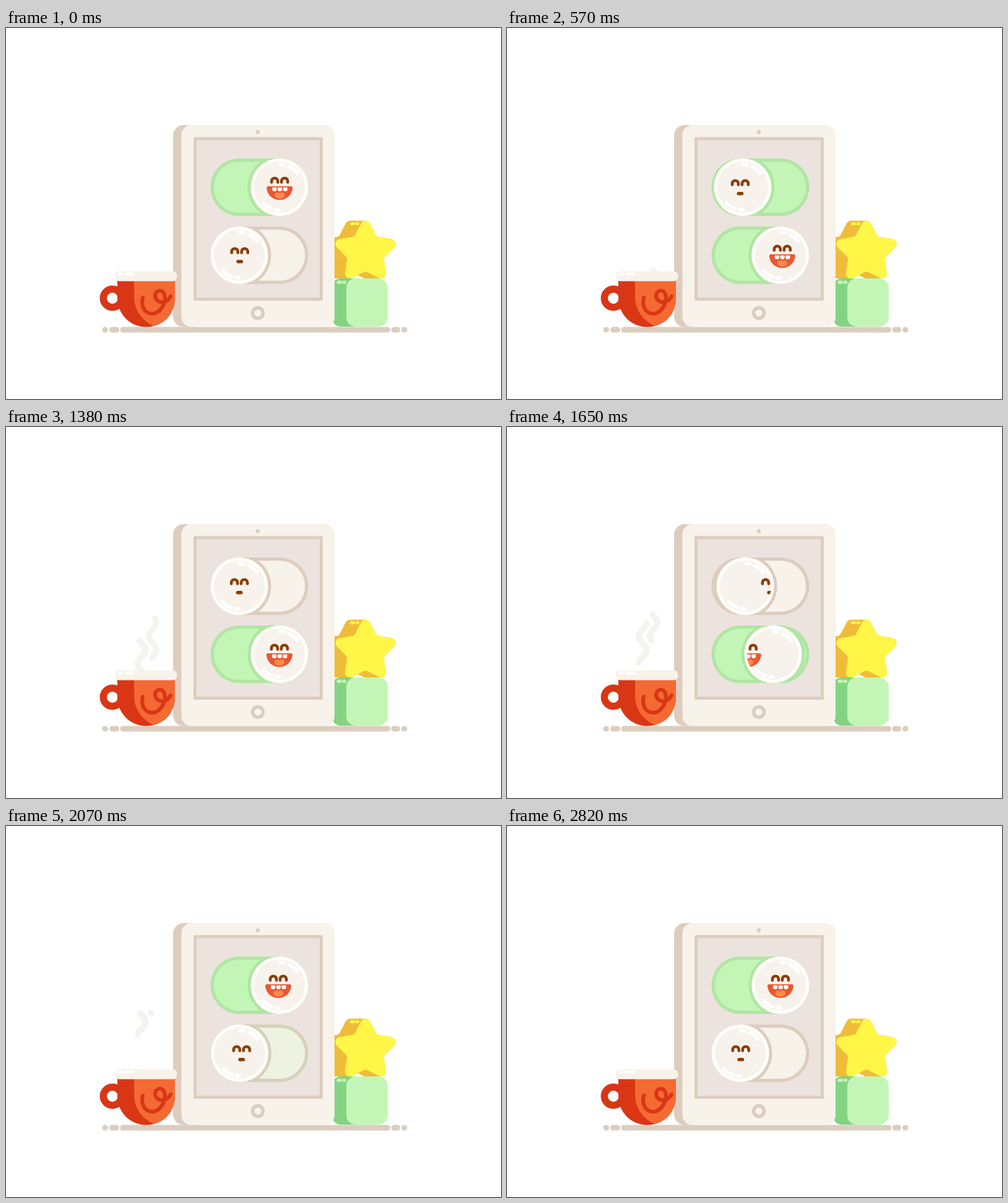
An HTML page with a canvas that plays this animation: 800 px wide and 600 px high, repeating every 2.85 s.

```html
<!DOCTYPE html>
<html lang="en">
<head>
<meta charset="utf-8">
<title>Toggles</title>
<style>
html, body { margin: 0; width: 100%; height: 100%; overflow: hidden; background: #fff; }
canvas { display: block; width: 800px; height: 600px; }
</style>
</head>
<body>
<canvas id="stage" width="800" height="600"></canvas>
<script>
const ctx = document.getElementById('stage').getContext('2d');
const LOOP = 2850, SWAP = 1380, STEP = 30;
const CREAM = '#f7f2ea', SAND = '#dccdbf', GREEN = '#c3f6b6', BROWN = '#8b3e04';
const RED = '#d93616', YELLOW = '#fff647', GOLD = '#efbc39';
const LEFT = 377, TRAVEL = 65, R = 46.5;
const OFF = { fill: [247, 242, 234], edge: [221, 205, 191] };
const ON = { fill: [195, 246, 182], edge: [177, 229, 164] };

const ramp = (t, a, b) => Math.min(1, Math.max(0, (t - a) / (b - a)));
const mix = (a, b, k) => `rgb(${a.map((v, i) => Math.round(v + (b[i] - v) * k)).join()})`;

function box(x0, y0, x1, y1, r, color) {
  ctx.fillStyle = color;
  ctx.beginPath();
  ctx.roundRect(x0, y0, x1 - x0, y1 - y0, r);
  ctx.fill();
}

function disc(x, y, r, color) {
  ctx.fillStyle = color;
  ctx.beginPath();
  ctx.arc(x, y, r, 0, Math.PI * 2);
  ctx.fill();
}

function stroke(path, color, width) {
  ctx.strokeStyle = color;
  ctx.lineWidth = width;
  ctx.lineCap = ctx.lineJoin = 'round';
  ctx.stroke(new Path2D(path));
}

function fill(path, color) {
  ctx.fillStyle = color;
  ctx.fill(new Path2D(path));
}

// ---------- still objects ----------

function ground() {
  for (const [a, b] of [[155.5, 165], [167, 183], [184.5, 621], [622.5, 637], [639, 648.5]])
    box(a, 483.5, b, 492.5, 4.5, SAND);
}

function star(cx, cy, color) {
  const pts = [];
  for (let i = 0; i < 10; i++) {
    const a = -Math.PI / 2 + i * Math.PI / 5, r = i % 2 ? 31 : 60;
    pts.push([cx + r * Math.cos(a), cy + r * Math.sin(a)]);
  }
  ctx.beginPath();
  ctx.moveTo((pts[9][0] + pts[0][0]) / 2, (pts[9][1] + pts[0][1]) / 2);
  pts.forEach((p, i) => ctx.arcTo(...p, ...pts[(i + 1) % 10], i % 2 ? 5 : 8));
  ctx.closePath();
  ctx.fillStyle = color;
  ctx.fill();
}

function toys() {
  box(527, 405, 600, 483, 14, '#84d383');
  box(550, 405, 617, 483, 15, GREEN);
  box(534.5, 408.5, 543, 414, 2.7, GREEN);
  box(543.5, 408.5, 550, 414, 2.7, GREEN);
  for (let dx = 25; dx >= 0; dx--) star(581 - dx, 362.5, GOLD);
  star(581, 362.5, YELLOW);
  box(556, 314, 564, 319, 2.5, YELLOW);
  box(564.5, 314, 571, 319, 2.5, YELLOW);
}

function tablet() {
  box(270, 157, 320, 483.5, 17, SAND);
  box(283.5, 157, 531, 483.5, 16, CREAM);
  disc(407, 168.5, 3.2, SAND);
  box(303, 176.5, 512, 441, 2, SAND);
  box(308, 181.5, 507, 436, 0, '#ece3de');
  disc(407, 461, 11.2, SAND);
  disc(407, 461, 5.8, CREAM);
}

function cup() {
  ctx.strokeStyle = RED;
  ctx.lineWidth = 11.5;
  ctx.beginPath();
  ctx.arc(172, 437, 14.7, 0, Math.PI * 2);
  ctx.stroke();
  fill('M180 405H273V437A46.5 46.5 0 0 1 180 437Z', RED);
  fill('M207 405H273V437C273 460 259 477 239 482C217 472 207 454 207 434Z', '#f36a33');
  stroke('M221 436C217 452 226 463 238 462C250 460 260 444 256 431C253 421 241 424 241 433C241 444 258 449 266 434', RED, 6);
  box(176, 393.5, 276.5, 409.5, 7, CREAM);
  box(180, 395.5, 189, 400.5, 2.5, '#fff');
  box(191, 395.5, 207, 400.5, 2.5, '#fff');
}

// ---------- steam ----------

function strand(t, cx, bend, amp) {
  const top = Math.max(302.5, 365 - 0.102 * (t - 840));
  const end = Math.min(402, 373 - 0.103 * (t - 1380));
  if (top > 400 || end < top - 1) return;
  const x = y => cx + amp * Math.cos((y - bend) / 44 * Math.PI * 2);
  ctx.beginPath();
  ctx.moveTo(x(top), top);
  for (let y = top + 1; y < end; y++) ctx.lineTo(x(y), y);
  ctx.lineTo(x(end), end + 0.01);
  ctx.strokeStyle = '#f5f3ee';
  ctx.lineWidth = 10;
  ctx.lineCap = ctx.lineJoin = 'round';
  ctx.stroke();
}

// ---------- toggles ----------

function eyes(y) {
  for (const x of [-8, 8])
    stroke(`M${x - 5} ${y + 1.7}V${y}A5 5 0 0 1 ${x + 5} ${y}V${y + 1.7}`, BROWN, 4.6);
}

function happy() {
  eyes(-9.8);
  fill('M-18 -1.5H18Q21.5 -1.5 21 2C19.5 13 11 20.5 0 20.5S-19.5 13 -21 2Q-21.5 -1.5 -18 -1.5Z', '#ea5733');
  for (const x of [-12, -3.3, 5.4]) box(x, 0.3, x + 7.2, 6.5, [1, 1, 3.2, 3.2], '#fffaf2');
  fill('M-8 13C-8 8.5 -3 7.5 0 9.5C3 7.5 8 8.5 8 13C8 16.5 4 18.3 0 18.3S-8 16.5 -8 13Z', '#ff8a48');
}

function sleepy() {
  eyes(-5.8);
  stroke('M-2.7 10.3H2.7', BROWN, 5.4);
}

function slide(s, on) {
  const [c, p, end, q] = on ? [356, 5, 750, 6.7] : [377, 3, 900, 4.6];
  return s < c ? 0.5 * (s / c) ** p : 1 - 0.5 * (1 - ramp(s, c, end)) ** q;
}

// The face shoots in, then rings out around the knob's centre
function arrive(s, on) {
  const d = s - (on ? 475 : 516);
  if (d < 0) return 0.9 * d;
  return 5 * Math.exp(-d / 400) * Math.sin(d / 250 * Math.PI * 2);
}

function shine(x, y) {
  ctx.strokeStyle = '#fff';
  ctx.lineWidth = 6;
  ctx.lineCap = 'round';
  for (const [a, b] of [[-88, -79], [-65, -38], [91, 98], [110, 136]]) {
    ctx.beginPath();
    ctx.arc(x, y, 36.7, a * Math.PI / 180, b * Math.PI / 180);
    ctx.stroke();
  }
}

function toggle(y, on, s, before) {
  const dir = on ? 1 : -1;
  const k = slide(s, on);
  const x = LEFT + TRAVEL * (on ? k : 1 - k);
  const green = on ? ramp(s, 420, 570) : 1 - ramp(s, 570, 720);
  const edge = mix(OFF.edge, ON.edge, green);

  ctx.save();
  box(LEFT - R, y - R, LEFT + TRAVEL + R, y + R, R, edge);
  ctx.clip();
  box(LEFT - 41.3, y - 41.3, LEFT + TRAVEL + 41.3, y + 41.3, 41.3, mix(OFF.fill, ON.fill, green));
  disc(x, y, 51.5, edge);
  ctx.restore();

  disc(x, y, R, '#fffef9');
  disc(x, y, 41.2, '#f7f2ec');
  shine(x, y);

  const leaving = s < 365;
  const shift = leaving
    ? dir * (90 * (s / 330) ** 4 - arrive(s + before, !on))
    : dir * arrive(s, on);
  ctx.save();
  ctx.beginPath();
  ctx.arc(x, y, 42, 0, Math.PI * 2);
  ctx.clip();
  ctx.translate(x + 0.3 + shift, y);
  if (leaving !== on) happy(); else sleepy();
  ctx.restore();
}

function draw(t) {
  const second = t >= SWAP;
  const s = second ? t - SWAP : t;
  const before = second ? SWAP : LOOP - SWAP;
  ctx.fillStyle = '#fff';
  ctx.fillRect(0, 0, 800, 600);
  ground();
  toys();
  tablet();
  toggle(257.5, second, s, before);
  toggle(367.5, !second, s, before);
  strand(t, 237, 316, 6);
  strand(t - 350, 219.5, 317, 6.5);
  cup();
}

const start = performance.now();
function tick() {
  const t = (performance.now() - start) % LOOP;
  draw(Math.floor(t / STEP) * STEP);
  requestAnimationFrame(tick);
}
tick();
</script>
</body>
</html>
```
